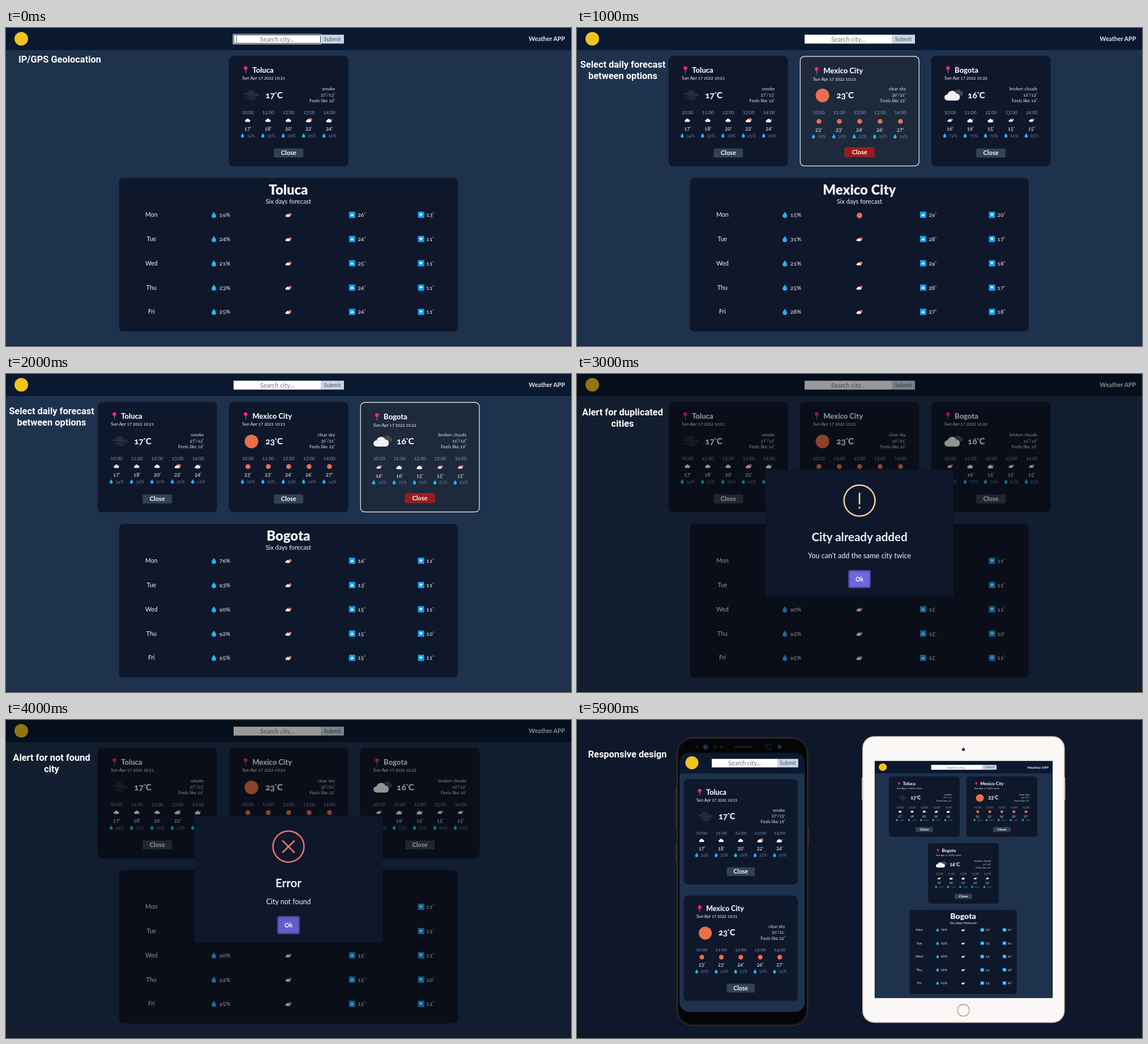
Recreate the animation shown at these times as an HTML page. Size 998 by 561 pixels, loop 6500 ms.

```html
<!DOCTYPE html>
<html lang="en">
<head>
<meta charset="utf-8">
<title>Weather APP</title>
<style>
  html, body { margin: 0; width: 100%; height: 100%; overflow: hidden; background: #0f172a; }
  svg { display: block; width: 998px; height: 561px; }
  text { font-family: Lato, "Open Sans", sans-serif; font-variant-numeric: oldstyle-nums; }
  .caption { font-family: Roboto, "Liberation Sans", sans-serif; font-variant-numeric: normal; }
  .degree { font-size: .6em; baseline-shift: .42em; }
</style>
</head>
<body>
<svg id="stage" viewBox="0 0 998 561"></svg>
<script>
const LOOP = 6500, STEP = 1000;
const C = {
  page: '#1e324e', bar: '#0a192f', card: '#0f172a', active: '#1e293b', button: '#334155',
  text: '#f1f5f9', hour: '#8795aa', muted: '#718096', sun: '#ec6e4c', drop: '#1fb6f5'
};

const CITIES = {
  toluca: {
    name: 'Toluca', date: 'Sun Apr 17 2022 10:21', icon: 'mist', now: 17,
    sky: 'smoke', range: '27°/13°', feels: 16,
    icons: ['cloud', 'cloud', 'cloud', 'partly', 'broken'],
    temps: [17, 18, 20, 22, 24], rain: [34, 32, 29, 25, 19],
    days: { rain: [19, 24, 21, 23, 25], max: [26, 24, 25, 24, 24], min: [13, 11, 11, 11, 11] }
  },
  mexico: {
    name: 'Mexico City', date: 'Sun Apr 17 2022 10:21', icon: 'clear', now: 23,
    sky: 'clear sky', range: '30°/21°', feels: 22,
    icons: Array(5).fill('clear'),
    temps: [23, 23, 24, 26, 27], rain: [29, 26, 23, 19, 14],
    days: { first: 'clear', rain: [15, 31, 21, 25, 28], max: [29, 28, 29, 28, 27], min: [20, 17, 18, 17, 18] }
  },
  bogota: {
    name: 'Bogota', date: 'Sun Apr 17 2022 10:22', icon: 'broken', now: 16,
    sky: 'broken clouds', range: '16°/12°', feels: 16,
    icons: ['showers', 'broken', 'broken', 'showers', 'showers'],
    temps: [16, 16, 15, 15, 15], rain: [72, 75, 79, 81, 83],
    days: { rain: [76, 93, 90, 92, 95], max: [16, 13, 15, 15, 15], min: [11, 11, 11, 10, 11] }
  }
};

const text = (x, y, str, size, { fill = C.text, weight = 400, anchor = 'start', cls = '' } = {}) =>
  `<text x="${x}" y="${y}" font-size="${size}" fill="${fill}" font-weight="${weight}" text-anchor="${anchor}" class="${cls}">${
    str.replace(/°/g, '<tspan class="degree">°</tspan>')}</text>`;
const rect = (x, y, w, h, fill, r = 0, extra = '') =>
  `<rect x="${x}" y="${y}" width="${w}" height="${h}" rx="${r}" fill="${fill}" ${extra}/>`;
const circle = (x, y, r, fill, extra = '') => `<circle cx="${x}" cy="${y}" r="${r}" fill="${fill}" ${extra}/>`;
const path = (d, fill, extra = '') => `<path d="${d}" fill="${fill}" ${extra}/>`;
const place = (x, y, sx, body, sy = sx) => `<g transform="translate(${x} ${y}) scale(${sx} ${sy})">${body}</g>`;

const cloud = (x, y, s, fill = '#f2f2f2') =>
  place(x, y, s, path('M-6 5A3.7 3.7 0 0 1-6-2.4A5.5 5.5 0 0 1 4.3-3.2A4.2 4.2 0 0 1 5.5 5Z', fill));

// Icons are drawn at the size of the current-weather slot.
const ICONS = {
  clear: () => circle(0.4, 0.4, 12, C.sun),
  cloud: () => cloud(0, 0, 1.45),
  broken: () => cloud(9, -4, 0.95, '#484848') + cloud(-1.5, 2, 1.5),
  partly: () => circle(7, -4, 8, C.sun) + cloud(-1.5, 2, 1.4),
  showers: () => cloud(7, -3, 0.8, '#484848') + circle(7, -4, 6, C.sun) + cloud(-2, 1, 1.15),
  mist: () => path('M-5-7.5H4M-8-4.5H7M-13-1.5H13M-5 1.2H14M-9 4.2H8M-4 7.2H7', 'none',
    'stroke="#3c3f49" stroke-width="1.3"')
};
const icon = (kind, x, y, s = 1) => place(x, y, s, ICONS[kind]());

const drop = (x, y, s = 1) =>
  place(x, y, s, path('M0-5.6C1 -3 4-.6 4 1.8A4 3.8 0 0 1-4 1.8C-4-.6-1-3 0-5.6Z', C.drop));
const arrow = (x, y, dir) => rect(x, y - 5.5, 11, 11, '#0ea5ee', 1.2) +
  path(`M${x + 2.4} ${y + 2 * dir}h6.2l-3.1 ${-4.4 * dir}z`, '#fff');
const pin = (x, y) => path(`M${x - 0.6} ${y}h1.2l-.5 10.2h-.4z`, '#a9b4c0') +
  circle(x, y, 3.4, '#e8178a') + circle(x - 1, y - 1.2, 0.9, '#ff7cc0');

function card(city, active = false) {
  const d = active ? 1.5 : 0;
  const end = { anchor: 'end', fill: '#dbe2ea' };
  const mid = { anchor: 'middle' };
  const box = active
    ? rect(0.6, 0.6, 209.8, 193.3, C.active, 7.5, 'stroke="#f1f5f9" stroke-width="1.2"')
    : rect(0, 0, 211, 194.5, C.card, 8);
  let out = box +
    pin(29.7, 21.5 + d) +
    text(41.5, 29 + d, city.name, 13, { weight: 800 }) +
    text(23.5, 41.5 + d, city.date, 7.7) +
    icon(city.icon, 39.5, 69) +
    text(64.5, 74, city.now + '°C', 15.4, { weight: 800 }) +
    text(187.5, 60.5, city.sky, 8.1, end) +
    text(187.5, 71, city.range, 8, end) +
    text(187.5, 81.5, `Feels like ${city.feels}°`, 8.1, end);
  city.temps.forEach((temp, i) => {
    const x = 33.5 + 36 * i;
    out += text(x, 102.5, `${10 + i}:00`, 8.7, { ...mid, fill: C.hour }) +
      icon(city.icons[i], x, 113.6 + d, 0.36) +
      text(x, 131.5 + d, temp + '°', 9.2, mid) +
      drop(x - 9.5, 140 + d, 0.7) +
      text(x - 2, 143 + d, city.rain[i] + '%', 7.8, { fill: C.muted });
  });
  return out + rect(79.5, 163 - d, 52, 16, active ? '#991b1b' : C.button, 2,
      active ? 'stroke="#c42a2a" stroke-width=".8"' : '') +
    text(105.5, 174.8 - d, 'Close', 11, { ...mid, weight: 700 });
}

function forecast({ name, days }, w = 598.5, step = 121) {
  const mid = { anchor: 'middle' };
  const col = i => w / 2 + (i - 2) * step;
  let out = rect(0, 0, w, 271, C.card, 8) +
    text(w / 2, 29, name, 23.8, { ...mid, weight: 900 }) +
    text(w / 2, 45.3, 'Six days forecast', 11, mid);
  ['Mon', 'Tue', 'Wed', 'Thu', 'Fri'].forEach((day, i) => {
    const y = 65 + 42.8 * i, base = y + 3.7;
    out += text(col(0), base, day, 10.6, mid) +
      drop(col(1) - 10.7, y) + text(col(1) - 1, base, days.rain[i] + '%', 10.4) +
      icon(i ? 'showers' : days.first || 'showers', col(2), y + 1, 0.41) +
      arrow(col(3) - 14, y, 1) + text(col(3) + 1.3, base, days.max[i] + '°', 10.4) +
      arrow(col(4) - 13.3, y, -1) + text(col(4) + 1.5, base, days.min[i] + '°', 10.4);
  });
  return out;
}

function header(w, { logoX = 23, x = w / 2 - 97, field = 154, title = true, focus = false } = {}) {
  const mid = { anchor: 'middle' };
  const button = field > 150 ? 41 : 38.5;
  return rect(0, 0, w, 39, C.bar) +
    circle(logoX, 19, 12, '#f3c31c') +
    rect(x, 11.8, field, 15.7, '#fff') +
    rect(x + field, 11.8, button, 15.7, '#cbd5e1') +
    (focus ? rect(x - 0.8, 11, field + 1.4, 17.2, 'none', 1.5, 'stroke="#fff" stroke-width="1.2"') +
      rect(x + 0.3, 12.1, field - 0.8, 15, 'none', 1, 'stroke="#101010" stroke-width=".9"') +
      rect(x + 4.7, 14, 0.8, 11.5, '#222') : '') +
    text(x + field / 2, 23.5, 'Search city...', 11.1, { ...mid, fill: '#757575' }) +
    text(x + field + button / 2, 22.8, 'Submit', 9.8, { ...mid, fill: '#475569' }) +
    (title ? text(w - 10.7, 23.4, 'Weather APP', 10.7, { anchor: 'end', weight: 700, fill: '#e2e8f0' }) : '');
}

const caption = (x, y, ...lines) => lines.map((line, i) =>
  text(x, y + 20 * i, line, 16.4, { anchor: 'middle', weight: 700, fill: '#fff', cls: 'caption' })).join('');

// cards: [city key, column]; the chosen city also fills the forecast panel.
function page(cards, chosen, { active = '', focus = false } = {}) {
  return rect(0, 0, 998, 561, C.page) + header(998, { logoX: 27, focus }) +
    cards.map(([key, col]) => place(161.8 + 231.9 * col, 49.5, 1, card(CITIES[key], key === active))).join('') +
    place(199.6, 264.5, 1, forecast(CITIES[chosen])) +
    rect(0, 560, 998, 1, '#14233a');
}

const ALL = [['toluca', 0], ['mexico', 1], ['bogota', 2]];

function alertBox(title, message, color, mark, button) {
  const mid = { anchor: 'middle' };
  return page(ALL, 'bogota') + rect(0, 0, 998, 561, '#000', 0, 'opacity=".4"') +
    rect(332.7, 169, 332.6, 223.5, C.card, 2.5) +
    circle(499, 223.3, 27.4, 'none', `stroke="${color}" stroke-width="2.5"`) +
    path(mark, 'none', `stroke="${color}" stroke-width="2.7"`) +
    text(499, 295, title, 20.5, { ...mid, weight: 700 }) +
    text(499, 325, message, 12.5, mid) +
    rect(480.2, 347, 37.6, 29.6, button, 2.5, 'stroke="#4a4693" stroke-width="2.4"') +
    text(499, 365.6, 'Ok', 10.4, { ...mid, weight: 700, fill: '#fff' });
}

function phone() {
  const s = 0.955;
  return rect(173.5, 117, 3, 70, '#29292c', 1) + rect(173.5, 219, 3, 32, '#29292c', 1) +
    rect(407.5, 190, 3, 33, '#29292c', 1) +
    rect(176.8, 31.2, 230.8, 507.8, '#050506', 28, 'stroke="#4b4743"') +
    rect(178.5, 33, 227.4, 504, 'none', 27, 'stroke="#1d1d20"') +
    circle(212, 47.5, 2.5, '#15171d') + circle(227, 47.5, 5, '#19243f') + circle(227, 47.5, 2.3, '#2b3d6a') +
    circle(244, 47.5, 3, '#141722') + circle(255, 47.5, 2.7, '#141722') +
    rect(278, 45.8, 30, 3.4, '#1f1f22', 1.7) +
    circle(338, 47.5, 5.5, '#090a0d', 'stroke="#2a2b30"') + circle(358, 47.5, 4, '#18213b') +
    circle(357, 47, 1.5, '#354b86') +
    `<clipPath id="glass">${rect(181, 58, 221.3, 457, '#000', 17)}</clipPath>` +
    `<g clip-path="url(#glass)">${rect(181, 58, 222, 457, C.page)}` +
    place(181, 57.3, s, header(232, { x: 59.7, field: 121.5, title: false })) + '</g>' +
    place(188.5, 104.3, s, card(CITIES.toluca)) +
    place(188.5, 309.7, s, card(CITIES.mexico));
}

function tablet() {
  const sx = 0.592, sy = 0.548;
  const mini = (x, y, body) => place(x, y, sx, body, sy);
  return rect(503, 101, 2, 40, '#b8a79e', 1) + rect(860.5, 101, 2, 40, '#b8a79e', 1) +
    rect(504, 28.5, 357.5, 505.7, '#dccbc0', 21) +
    rect(505.8, 30.2, 353.9, 502.3, '#faf8f7', 19.5) +
    circle(682.5, 52, 2.7, '#303238') +
    circle(682.5, 512, 10.5, '#faf9f8', 'stroke="#a8968c" stroke-width="1.3"') +
    rect(525.8, 72.3, 314.4, 418.2, '#10151f') +
    rect(526.8, 73.3, 312.4, 416.2, C.page) +
    mini(526.5, 72.7, header(528.7)) +
    mini(551, 99.5, card(CITIES.toluca)) +
    mini(688, 99.5, card(CITIES.mexico)) +
    mini(620, 217.3, card(CITIES.bogota)) +
    mini(587.5, 334.7, forecast(CITIES.bogota, 319.5, 65.5));
}

const scenes = [
  page([['toluca', 1]], 'toluca', { focus: true }) + caption(95, 60.5, 'IP/GPS Geolocation'),
  page(ALL, 'mexico', { active: 'mexico' }) + caption(81, 70, 'Select daily forecast', 'between options'),
  page(ALL, 'bogota', { active: 'bogota' }) + caption(80.5, 71, 'Select daily forecast', 'between options'),
  alertBox('City already added', "You can't add the same city twice", '#f9cfa3',
    'M499 209.5V230M499 234V237.5', '#7066e0') + caption(80.5, 73, 'Alert for duplicated', 'cities'),
  alertBox('Error', 'City not found', '#f27474',
    'M488.3 212.6L509.7 234M509.7 212.6L488.3 234', '#655cca') + caption(80.5, 71.8, 'Alert for not found', 'city'),
  rect(0, 0, 998, 561, C.card) + phone() + tablet() + caption(89, 66, 'Responsive design')
];

const stage = document.getElementById('stage');
stage.innerHTML = scenes.map(body => `<g display="none">${body}</g>`).join('');
const layers = [...stage.children];

let shown = -1;
function draw() {
  const next = Math.min(layers.length - 1, Math.floor(performance.now() % LOOP / STEP));
  if (next !== shown) {
    layers.forEach((layer, i) => layer.setAttribute('display', i === next ? 'inline' : 'none'));
    shown = next;
  }
  requestAnimationFrame(draw);
}
draw();
</script>
</body>
</html>
```
